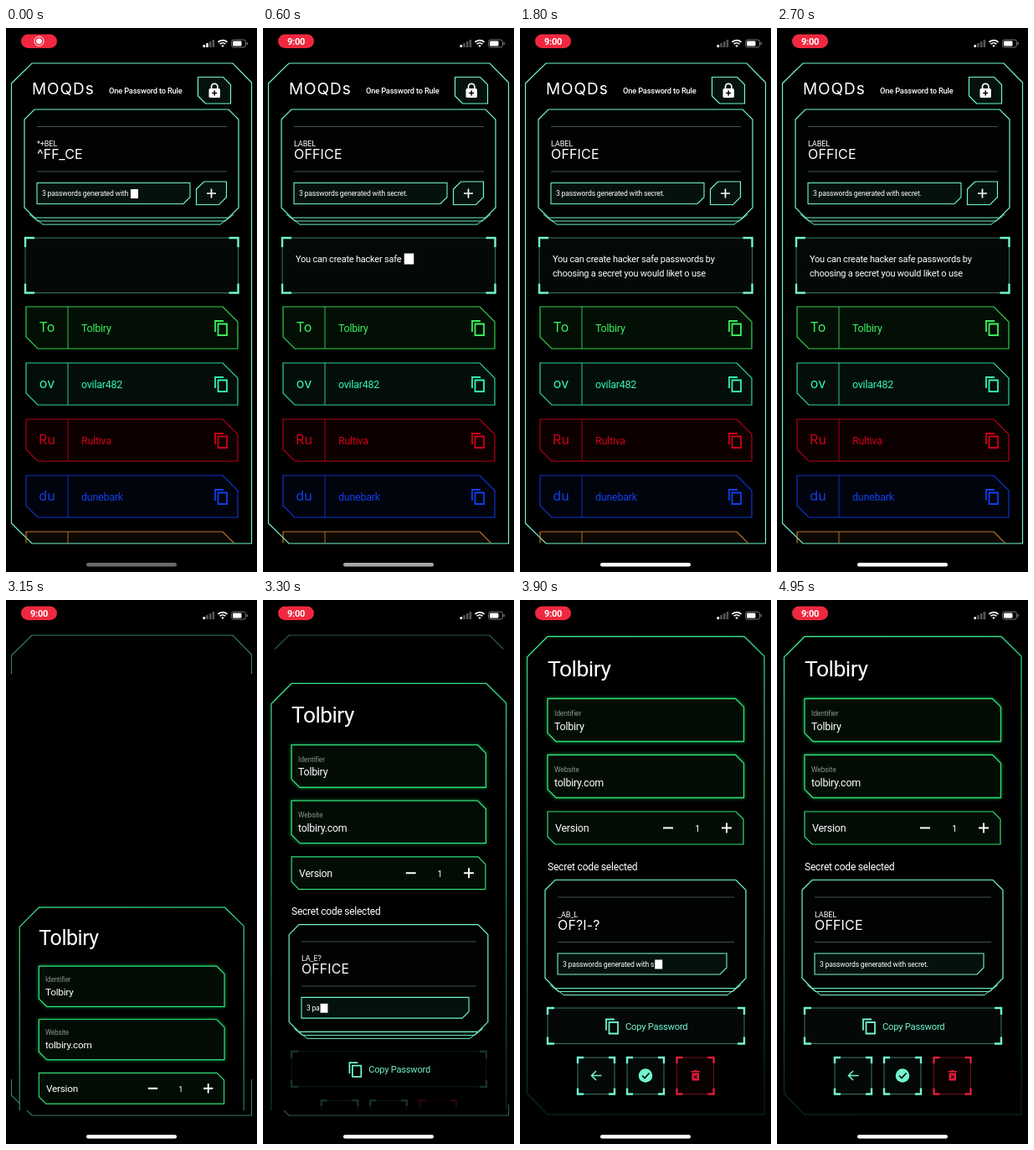
An HTML page for the animation above (5000 ms loop, 300 by 648 pixels).

```html
<!DOCTYPE html>
<html lang="en">
<head>
<meta charset="utf-8">
<title>Password manager</title>
<style>
  html, body { margin: 0; height: 100%; background: #000; overflow: hidden; }
  svg { display: block; width: 100vw; height: 100vh; }
  text { font-family: Roboto, sans-serif; letter-spacing: -.02em; white-space: pre; fill: #fff; }
  .wide { font-family: Inter, sans-serif; letter-spacing: .01em; }
</style>
</head>
<body>
<svg id="stage" viewBox="0 0 300 648" fill="none"></svg>
<script>
const AQUA = '#72f5cf', GREEN = '#2ee078', RED = '#e01c38', LOOP = 5000;
const MESSAGE = ['You can create hacker safe passwords by ', 'choosing a secret you would liket o use'];
const SUMMARY = '3 passwords generated with secret.';
const GLITCHES = [['*+BEL', '^FF_CE'], ['LA_E?', 'OFFICE'], ['_AB_L', 'OF?I-?'], ['L?BE_', 'O-FI*E'], ['LAB^L', '_FFI?E']];
const ROWS = [
  ['To', 'Tolbiry', '#38f45c'],
  ['ov', 'ovilar482', '#35f7b5'],
  ['Ru', 'Rultiva', '#cf0018'],
  ['du', 'dunebark', '#123fe8'],
  ['', '', '#e08a35'],
];

const text = (x, y, size, str, attrs = '') => `<text x="${x}" y="${y}" font-size="${size}" ${attrs}>${str}</text>`;
const path = (d, color, width = 1, attrs = '') => `<path d="${d}" stroke="${color}" stroke-width="${width}" ${attrs}/>`;
const rect = (x, y, w, h, attrs) => `<rect x="${x}" y="${y}" width="${w}" height="${h}" ${attrs}/>`;

// Box with cut corners: top left, top right, bottom right, bottom left
function box(x, y, w, h, [tl, tr, br, bl], color, width = 1.2, attrs = '') {
  const r = x + w, b = y + h;
  return path(`M${x} ${y + tl}L${x + tl} ${y}H${r - tr}L${r} ${y + tr}V${b - br}L${r - br} ${b}H${x + bl}L${x} ${b - bl}Z`, color, width, attrs);
}

function bracketBox(x, y, w, h, len, color) {
  const r = x + w, b = y + h;
  return rect(x, y, w, h, `fill="${color}" fill-opacity=".035" stroke="${color}" stroke-opacity=".6" stroke-width=".8"`) +
    path(`M${x} ${y + len}V${y}H${x + len}M${r - len} ${y}H${r}V${y + len}M${r} ${b - len}V${b}H${r - len}M${x + len} ${b}H${x}V${b - len}`, color, 2.4);
}

const copyIcon = (x, y, color) =>
  path(`M${x + 1} ${y + 14}V${y + 1}H${x + 11}M${x + 4.5} ${y + 4.5}H${x + 15}V${y + 18}H${x + 4.5}Z`, color, 1.8);

function card(x, y, w, h, inputWidth, id) {
  const b = y + h, stack = (dx, dy) => path(`M${x + dx} ${b + dy - 8}l10 8H${x + w - dx - 10}l10 -8`, AQUA);
  return stack(12, 8) + stack(6, 4) + box(x, y, w, h, [12, 12, 12, 12], AQUA, 1.2, 'fill="#000302"') +
    path(`M${x + 15} ${y + 20.5}H${x + w - 14}M${x + 15} ${y + 74}H${x + w - 14}`, '#536762', .8) +
    text(x + 15, y + 44, 9.2, 'LABEL', `id="${id}Label"`) +
    text(x + 15, y + 59, 16, 'OFFICE', `id="${id}Name" class="wide"`) +
    box(x + 15, y + 87.5, inputWidth, 25, [0, 0, 8, 0], AQUA, 1.1, 'fill="#04110d"') +
    text(x + 21, y + 103, 8.6, '', `id="${id}Summary"`) +
    rect(0, y + 95, 9, 11, `id="${id}Caret" fill="#fff"`);
}

function row([code, name, color], i) {
  const y = 332 + i * 67;
  return box(24, y, 253, 50, [0, 18, 0, 14], color, 1.2, `fill="${color}" fill-opacity=".055" stroke-opacity=".85"`) +
    path(`M74 ${y}V${y + 50}`, color, .8) +
    text(49, y + 30, 16, code, `class="wide" style="fill:${color}" text-anchor="middle"`) +
    text(90, y + 30, 12.5, name, `style="fill:${color}"`) + copyIcon(249, y + 16, color);
}

const field = (y, label, value) =>
  box(33, y, 234.5, 51, [0, 10, 0, 10], GREEN, 1.3, `fill="#020c05" style="filter:drop-shadow(0 0 2px #0b7a35)"`) +
  text(41, y + 20, 8.6, label, 'style="fill:#8a938e"') + text(41, y + 37, 12.5, value);

const statusBar =
  rect(18, 7.5, 43, 16.5, 'rx="8.2" fill="#f0283f"') +
  text(39.5, 19.7, 11, '9:00', 'id="clock" font-weight="700" text-anchor="middle"') +
  `<g id="recording" stroke="#fff"><circle cx="39.5" cy="15.7" r="5.6"/><circle cx="39.5" cy="15.7" r="3" fill="#fff"/></g>` +
  [0, 1, 2, 3].map(i => rect(235.5 + i * 3.7, 20 - i * 2, 2.6, 3 + i * 2, `rx=".6" fill="${i ? '#555' : '#fff'}" ${i === 1 ? 'id="bar"' : ''}`)).join('') +
  path('M253.5 16.8a8 8 0 0 1 11 0M255.6 19.2a5 5 0 0 1 6.8 0', '#fff', 1.8) +
  '<path d="M257.3 21a2.5 2.5 0 0 1 3.4 0L259 23Z" fill="#fff"/>' +
  rect(269.5, 14, 17, 9, 'rx="2.6" stroke="#777"') + rect(271, 15.5, 10.5, 6, 'rx="1.3" fill="#fff"') + rect(287.5, 17, 1.3, 3, 'fill="#777"');

const content =
  text(31, 79, 19, 'MOQDs', 'class="wide" style="letter-spacing:.05em"') +
  text(123, 78, 9.3, 'One Password to Rule', 'font-weight="500"') +
  box(229.5, 58.5, 39, 31.5, [0, 9, 0, 9], AQUA, 1.2, 'fill="#04110d"') +
  path('M245.5 73v-3a3.7 3.7 0 0 1 7.4 0v3', '#fff', 1.7) + rect(242.5, 72, 13.4, 11, 'rx="1.5" fill="#fff"') +
  path('M249.2 74.5v6M246.2 77.5h6', '#000', 1.5) +
  card(22, 97, 256, 129, 183, 'main') +
  box(227.5, 183, 36, 27.5, [9, 0, 9, 0], AQUA, 1.2, 'fill="#04110d"') + path('M240 197h11M245.5 191.5v11', '#fff', 1.7) +
  bracketBox(23, 250, 254.5, 65.5, 11, AQUA) +
  text(39, 278.5, 11, '', 'id="line0"') + text(39, 296, 11, '', 'id="line1"') +
  rect(0, 0, 11.5, 13, 'id="caret" fill="#fff"') +
  `<g clip-path="url(#listClip)">${ROWS.map(row).join('')}</g>`;

const sheet =
  '<path d="M8.5 68L33 43.5H268L292 67V613H33L8.5 588Z" fill="#000" stroke="url(#fade)" stroke-width="1.3"/>' +
  text(33, 91, 26.5, 'Tolbiry') +
  field(117.5, 'Identifier', 'Tolbiry') + field(184.5, 'Website', 'tolbiry.com') +
  box(33, 252, 234, 39, [0, 9, 0, 9], GREEN, 1.2, 'fill="#020c05"') +
  text(42, 276, 12.5, 'Version') + text(212, 276, 10.5, '1', 'text-anchor="middle"') +
  path('M171 271.5h12M241 271.5h12M247 265.5v12', '#fff', 1.9) +
  text(33, 322, 12.1, 'Secret code selected') +
  card(30, 333.5, 240, 129, 202, 'sheet') +
  `<g id="actions">${bracketBox(33, 486, 235, 42.5, 8, AQUA)}${bracketBox(69, 545, 44, 43.5, 7, AQUA)}
   ${bracketBox(128, 545, 44, 43.5, 7, AQUA)}${bracketBox(187.5, 545, 44, 43.5, 7, RED)}</g>` +
  copyIcon(102, 498.5, AQUA) + text(126, 512, 11.2, 'Copy Password', `style="fill:${AQUA}"`) +
  path('M97.500 566.5H86M91 561L85.500 566.5L91 572', AQUA, 1.6) +
  `<circle cx="150" cy="566.5" r="8.3" fill="${AQUA}"/>` + path('M146 566.5l3 3l5.500 -6', '#000', 1.6) +
  `<path d="M204.500 561H207.500L208.500 560H211L212 561H215V562.5H204.500ZM205.500 563.500H214V572.500H205.500Z" fill="${RED}"/>` +
  path('M208 566l3.600 4M211.600 566l-3.600 4', '#000', 1.1);

document.getElementById('stage').innerHTML = `
  <defs>
    <linearGradient id="fade" gradientUnits="userSpaceOnUse" x1="60" y1="43" x2="140" y2="613">
      <stop stop-color="#35e88d"/><stop offset=".45" stop-color="#1c8a4b"/><stop offset="1" stop-color="#06200f"/>
    </linearGradient>
    <clipPath id="listClip">${rect(0, 320, 300, 293.5, '')}</clipPath>
    <clipPath id="sheetClip">${rect(0, 0, 300, 648, 'id="sheetWindow"')}</clipPath>
  </defs>
  ${path('M6.5 66L31 42H271L293.5 65V614H31L6.5 590Z', AQUA, 1.2, 'id="frame"')}
  ${rect(0, 0, 300, 0, 'id="wipe" fill="#000"')}
  <g id="content">${content}</g>
  <g id="sheetOuter" clip-path="url(#sheetClip)"><g id="sheet">${sheet}</g></g>
  ${statusBar}${rect(96, 637, 108, 4.5, 'id="home" rx="2.2" fill="#fff"')}`;

const $ = id => document.getElementById(id);
const set = (id, attrs) => { for (const k in attrs) $(id).setAttribute(k, attrs[k]); };
const ramp = (t, from, to) => Math.min(1, Math.max(0, (t - from) / (to - from)));
const easeInOut = p => p < .5 ? 4 * p ** 3 : 1 - 4 * (1 - p) ** 3;

function typeInto(id, caret, str, count) {
  const el = $(id), n = Math.max(0, Math.floor(count));
  el.textContent = str.slice(0, n);
  const typing = n > 0 && n < str.length;
  set(caret, { opacity: +typing });
  if (typing) set(caret, { x: +el.getAttribute('x') + el.getComputedTextLength() + 1 });
  return typing;
}

function typeCard(id, t, count, settle) {
  const step = Math.max(0, Math.floor(t / 100));
  const [label, name] = t < settle ? GLITCHES[step % GLITCHES.length] : ['LABEL', 'OFFICE'];
  $(id + 'Label').textContent = label;
  $(id + 'Name').textContent = name;
  typeInto(id + 'Summary', id + 'Caret', SUMMARY, count);
}

function typeMessage(count) {
  const first = MESSAGE[0].length;
  const onFirst = typeInto('line0', 'caret', MESSAGE[0], count);
  if (onFirst) $('line1').textContent = '';
  else typeInto('line1', 'caret', MESSAGE[1], count - first);
  set('caret', { y: onFirst ? 268.5 : 286 });
}

function render(t) {
  set('recording', { opacity: 1 - ramp(t, 300, 500) });
  set('clock', { opacity: ramp(t, 300, 500) });
  set('bar', { fill: t < 600 ? '#fff' : '#555' });
  set('home', { opacity: .42 + .58 * ramp(t, 0, 1500) });

  const wipe = 271 * ramp(t, 2750, 3200);
  set('wipe', { y: 329.5 - wipe, height: 2 * wipe });
  set('frame', { opacity: 1 - .62 * ramp(t, 2750, 3250) - .38 * ramp(t, 3300, 3500) });
  set('content', { opacity: 1 - ramp(t, 2750, 3100) });
  typeCard('main', t, 27 + t / 25, 350);
  typeMessage((t - 100) / 18.5);

  const left = 1 - easeInOut(ramp(t, 2800, 3490));
  set('sheetOuter', { display: left < 1 ? 'inline' : 'none' });
  set('sheetWindow', { height: 648 - 40 * Math.min(1, left / .08) });
  set('sheet', { transform: `translate(150 ${324 + 648 * left}) scale(${1 - .115 * left}) translate(-150 -324)` });
  set('actions', { opacity: .2 + .8 * ramp(t, 3300, 3600) });
  typeCard('sheet', t - 3200, (t - 3200) / 25, 1100);
}

function tick() {
  render(performance.now() % LOOP);
  requestAnimationFrame(tick);
}
tick();
</script>
</body>
</html>
```
